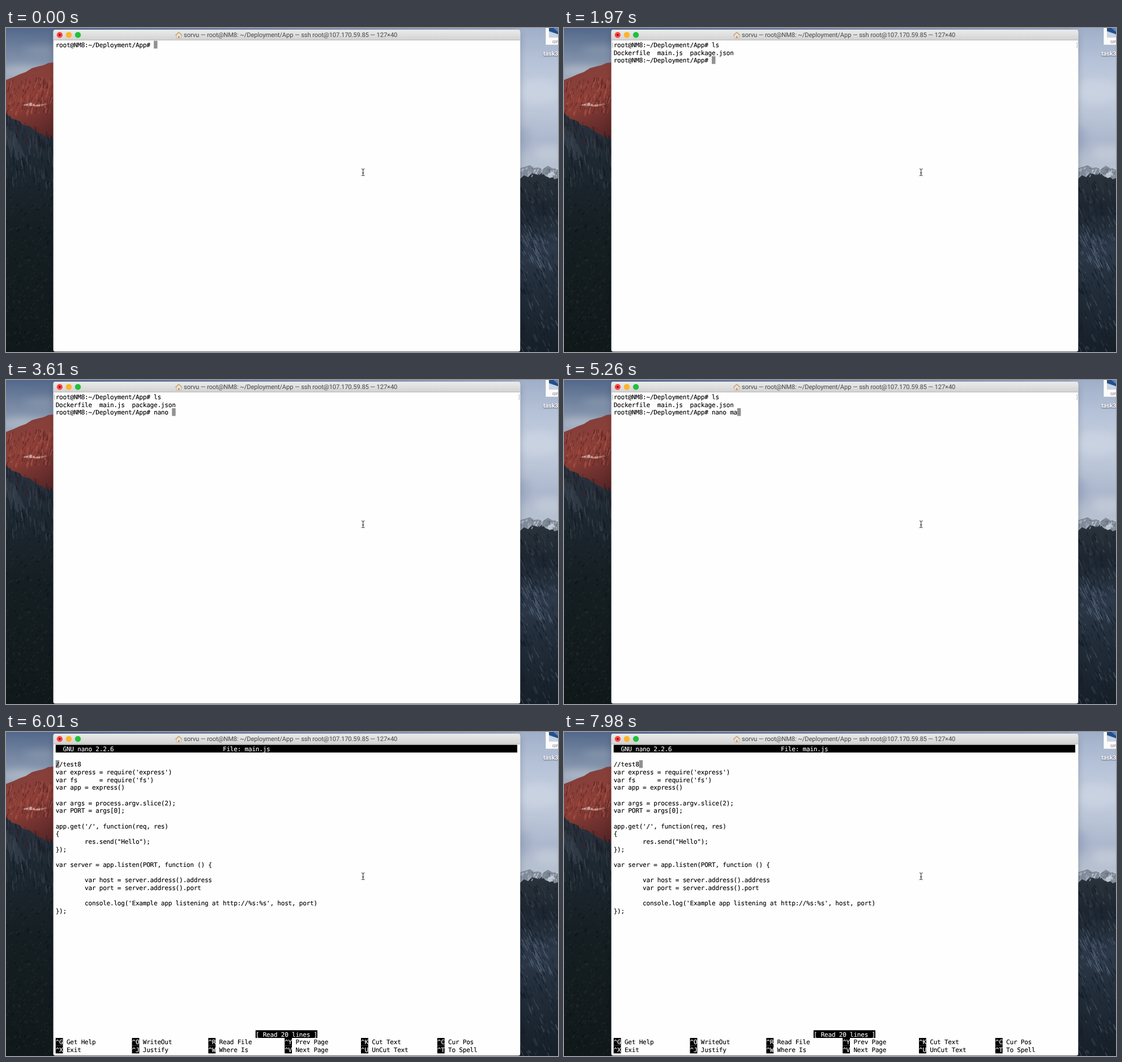
These frames come from a looping animation (975 px wide and 574 px high, 8 s). An HTML page:

```html
<!DOCTYPE html>
<html lang="en">
<head>
<meta charset="utf-8">
<title>Terminal session</title>
<style>
  html, body { margin: 0; width: 100%; height: 100%; overflow: hidden; background: #141c22; }
  svg { display: block; width: 975px; height: 574px; }
  text { white-space: pre; text-rendering: geometricPrecision; }
  .mono { font: 11px "DejaVu Sans Mono", monospace; letter-spacing: -0.2024px; stroke-width: .14px; }
  .ui { font-family: Roboto, "Open Sans", sans-serif; }
</style>
</head>
<body>
<svg viewBox="0 0 975 574" xmlns="http://www.w3.org/2000/svg">
  <defs>
    <linearGradient id="skyTop">
      <stop stop-color="#53688a"/><stop offset="1" stop-color="#a3b1ca"/>
    </linearGradient>
    <linearGradient id="skyLeft" x2="0" y2="1">
      <stop stop-color="#53688a"/><stop offset=".4" stop-color="#7688a3"/><stop offset="1" stop-color="#aab5c6"/>
    </linearGradient>
    <linearGradient id="skyRight" x2="0" y2="1">
      <stop stop-color="#a0afc9"/><stop offset=".2" stop-color="#b4c1d7"/><stop offset=".42" stop-color="#c5cfdf"/>
      <stop offset=".72" stop-color="#acb8cd"/><stop offset="1" stop-color="#bdc6d3"/>
    </linearGradient>
    <linearGradient id="cliff" x2=".3" y2="1">
      <stop stop-color="#7f403d"/><stop offset=".5" stop-color="#8d3f37"/><stop offset="1" stop-color="#5a2728"/>
    </linearGradient>
    <linearGradient id="forest" x2="0" y2="1">
      <stop stop-color="#2b3542"/><stop offset=".22" stop-color="#1d2730"/>
      <stop offset=".5" stop-color="#151e22"/><stop offset="1" stop-color="#10181a"/>
    </linearGradient>
    <linearGradient id="rock" x2="0" y2="1">
      <stop stop-color="#2a323c"/><stop offset=".2" stop-color="#1d2630"/><stop offset=".42" stop-color="#2c3848"/>
      <stop offset=".65" stop-color="#222d3a"/><stop offset="1" stop-color="#161f28"/>
    </linearGradient>
    <linearGradient id="titleBar" x2="0" y2="1">
      <stop stop-color="#ebebeb"/><stop offset="1" stop-color="#d3d3d3"/>
    </linearGradient>
    <filter id="shade" x="-10%" y="-10%" width="120%" height="120%">
      <feDropShadow dx="0" dy="4" stdDeviation="6" flood-opacity=".2"/>
    </filter>
    <filter id="soft" x="-50%" y="-50%" width="200%" height="200%"><feGaussianBlur stdDeviation="7"/></filter>
  </defs>

  <g id="wallpaper">
    <rect width="975" height="8" fill="url(#skyTop)"/>
    <rect width="100" height="110" fill="url(#skyLeft)"/>
    <rect x="895" width="80" height="275" fill="url(#skyRight)"/>
    <g filter="url(#soft)">
      <ellipse cx="30" cy="76" rx="40" ry="9" fill="#b9c2cf" opacity=".7"/>
      <ellipse cx="62" cy="40" rx="30" ry="7" fill="#8c9ab0" opacity=".7"/>
      <ellipse cx="940" cy="112" rx="34" ry="22" fill="#ccd5e3" opacity=".7"/>
      <ellipse cx="915" cy="196" rx="11" ry="22" fill="#99a6c0" opacity=".6"/>
      <ellipse cx="958" cy="222" rx="26" ry="14" fill="#c5ceda" opacity=".7"/>
    </g>
    <path d="M0 92L13 87 24 82 35 78 46 71 57 68 66 66 75 62 84 61V215H0Z" fill="url(#cliff)"/>
    <path d="M0 150L9 160 22 164 31 172 42 174 54 184 62 187 72 194 84 196V574H0Z" fill="url(#forest)"/>
    <path d="M905 249L916 246 925 243 933 248 940 247 948 250 957 244 966 249 975 250V275H905Z" fill="#818b9a"/>
    <path d="M905 270L915 261 922 264 930 257 938 260 947 257 955 264 963 262 969 268 975 266V574H905Z" fill="url(#rock)"/>
    <path d="M28 137L44 132 52 136 75 134 60 139 42 138Z" fill="#c8a69c"/>
    <path d="M0 168L18 190 34 228 20 235 0 205Z" fill="#394350" opacity=".6"/>
    <path d="M952 260L966 255 973 262 960 266Z" fill="#b9c0ca"/>
    <g id="texture" fill="none"/>
  </g>

  <g id="desktopFile" class="ui">
    <rect x="953" y="-4" width="24" height="34" fill="#fbfbfb" stroke="#a7afbb" stroke-width=".6"/>
    <path d="M959 0H975V17H959Z" fill="#5e86bd"/>
    <path d="M959 6L975 11V17H959Z" fill="#c5d3e3"/>
    <path d="M959 0H967L975 7V11L959 5Z" fill="#284e87"/>
    <text x="965" y="27" font-size="7" fill="#777">GIF</text>
    <text x="949" y="48.5" font-size="10.6" font-weight="600" fill="#fff"
      style="text-shadow:0 1px 2px #0009">task3</text>
  </g>

  <g id="window">
    <path d="M83.6 570V7Q83.6 3 87.6 3H904.2Q908.2 3 908.2 7V570Q908.2 573.3 905 573.3H87Q83.6 573.3 83.6 570Z" fill="#fefefe" filter="url(#shade)"/>
    <path d="M83.6 21V7Q83.6 3 87.6 3H904.2Q908.2 3 908.2 7V21Z" fill="url(#titleBar)"/>
    <path d="M83.6 21.3H908.2" stroke="#adadad" stroke-width=".9"/>
    <circle cx="94.8" cy="12.3" r="5.2" fill="#fc4845"/>
    <circle cx="94.8" cy="12.3" r="1.7" fill="#720c0a"/>
    <circle cx="110.9" cy="12.3" r="5.2" fill="#fdb32a"/>
    <circle cx="127" cy="12.3" r="5.2" fill="#22c03a"/>
    <path d="M301 12.5V18H309.5V12.5L305.2 8.5Z" fill="#efe3cd" stroke="#b9a78c" stroke-width=".7"/>
    <path d="M299.2 13L305.2 7.4 311.2 13" fill="none" stroke="#c5a583" stroke-width="1.3"/>
    <path d="M304 18V14.2H306.6V18Z" fill="#b69b7b"/>
    <text class="ui" x="314" y="16.4" font-size="11.2" letter-spacing="-.13" fill="#484848">sorvu — root@NM8: ~/Deployment/App — ssh root@107.170.59.85 — 127×40</text>
  </g>

  <g id="screen"></g>

  <path d="M628 249.5Q630.7 249.5 630.7 251.5V259.8Q630.7 261.8 628 261.8M633.4 249.5Q630.7 249.5 630.7 251.5M630.7 259.8Q630.7 261.8 633.4 261.8M629 256.8H632.4"
    fill="none" stroke="#222" stroke-width="1"/>
</svg>

<script>
const LOOP = 8000, LEFT = 87.7, TOP = 22.67, CELL = 6.42, ROW = 13.667, COLS = 127;
const PROMPT = 'root@NM8:~/Deployment/App# ';
const CODE = `//test8
var express = require('express')
var fs      = require('fs')
var app = express()

var args = process.argv.slice(2);
var PORT = args[0];

app.get('/', function(req, res)
{
        res.send("Hello");
});

var server = app.listen(PORT, function () {

        var host = server.address().address
        var port = server.address().port

        console.log('Example app listening at http://%s:%s', host, port)
});`.split('\n');
const HELP = [
  ['^G Get Help', '^O WriteOut', '^R Read File', '^Y Prev Page', '^K Cut Text', '^C Cur Pos'],
  ['^X Exit', '^J Justify', '^W Where Is', '^V Next Page', '^U UnCut Text', '^T To Spell']
];

const cellX = col => LEFT + col * CELL;
const rowY = row => TOP + row * ROW;
const escapeText = s => s.replace(/&/g, '&amp;').replace(/</g, '&lt;').replace(/ /g, '\u00a0');

const fillCells = (col, row, count, color) =>
  `<rect x="${cellX(col)}" y="${rowY(row)}" width="${count * CELL}" height="${ROW}" fill="${color}"/>`;
const print = (col, row, s, color = '#000') =>
  `<text class="mono" x="${cellX(col)}" y="${rowY(row) + 11.2}" fill="${color}" stroke="${color}">${escapeText(s)}</text>`;
const inverse = (col, row, s, count = s.length) =>
  fillCells(col, row, count, '#000') + print(col, row, s, '#fff');
const cursor = (col, row) => fillCells(col, row, 1, '#929292');

// Brackets the terminal puts around a submitted prompt line.
const lineMarks = row => {
  const y = rowY(row) + 3.6;
  return `<path d="M87 ${y}H85.5V${y + 8}H87M905 ${y}H906.5V${y + 8}H905" fill="none" stroke="#b4b4b4" stroke-width=".9"/>`;
};

const promptLine = (row, typed) =>
  cursor(PROMPT.length + typed.length, row) + print(0, row, PROMPT + typed);

const firstPrompt = typed => promptLine(0, typed);

const secondPrompt = (typed, submitted) =>
  lineMarks(0) + print(0, 0, PROMPT + 'ls') +
  print(0, 1, 'Dockerfile  main.js  package.json') +
  promptLine(2, typed) + (submitted ? lineMarks(2) : '');

const editor = col =>
  fillCells(0, 0, COLS, '#000') +
  print(2, 0, 'GNU nano 2.2.6', '#fff') + print(46, 0, 'File: main.js', '#fff') +
  cursor(col, 2) + CODE.map((line, i) => print(0, i + 2, line)).join('') +
  inverse(55, 37, '[ Read 20 lines ]') +
  HELP.map((items, r) => items.map((item, i) =>
    inverse(i * 21, 38 + r, item.slice(0, 2)) + print(i * 21 + 3, 38 + r, item.slice(3))
  ).join('')).join('');

const STEPS = [
  [0, firstPrompt, ''], [450, firstPrompt, 'ls'],
  [620, secondPrompt, ''], [1370, secondPrompt, 'n'], [1970, secondPrompt, ''],
  [2270, secondPrompt, 'n'], [2420, secondPrompt, 'na'], [2560, secondPrompt, 'nan'],
  [3460, secondPrompt, 'nano'], [3610, secondPrompt, 'nano '],
  [5260, secondPrompt, 'nano ma'], [5560, secondPrompt, 'nano main.js '],
  [5860, secondPrompt, 'nano main.js ', true],
  ...[6010, 7060, 7240, 7380, 7530, 7680, 7830, 7980].map((time, col) => [time, editor, col])
];

function drawTexture() {
  let seed = 7;
  const random = () => (seed = seed * 16807 % 2147483647) / 2147483647;
  // skew moves the band's lower side down across its width
  const streaks = (count, x, y, w, h, length, slant, skew, colors) => {
    let out = '';
    for (let i = 0; i < count; i++) {
      const u = random(), len = length * (.4 + random());
      const px = x + u * w, py = y + u * skew + random() * h;
      out += `<path d="M${px.toFixed(1)} ${py.toFixed(1)}l${(slant * len).toFixed(1)} ${len.toFixed(1)}" stroke="${colors[i % colors.length]}" stroke-width="${(.8 + 1.2 * random()).toFixed(1)}" opacity=".6"/>`;
    }
    return out;
  };
  document.getElementById('texture').innerHTML =
    streaks(190, 2, 92, 82, 58, 9, -.25, -8, ['#5e2629', '#b9604f', '#4b2229', '#a14a3c']) +
    streaks(70, 0, 152, 84, 30, 13, .1, 36, ['#3a2529', '#1a222c', '#141b24']) +
    streaks(110, 0, 180, 84, 85, 14, .1, 14, ['#404b59', '#111920', '#303a46']) +
    streaks(420, 2, 265, 82, 305, 3.5, -.9, 0, ['#232e31', '#0a1012', '#2a3434']) +
    streaks(60, 908, 246, 67, 14, 4, -.4, 2, ['#c3cad3', '#4f5a69', '#dde1e6']) +
    streaks(280, 908, 268, 67, 300, 9, .45, 0, ['#4a596c', '#10171f', '#354253', '#151d27']) +
    streaks(70, 910, 340, 50, 55, 11, .5, 40, ['#5a6b81', '#46566b']);
}

const screen = document.getElementById('screen');
const start = performance.now();
let shown = null;

function update() {
  const time = (performance.now() - start) % LOOP;
  const step = STEPS.findLast(([from]) => from <= time);
  if (step !== shown) {
    const [, draw, ...state] = step;
    screen.innerHTML = draw(...state);
    shown = step;
  }
  requestAnimationFrame(update);
}

drawTexture();
update();
</script>
</body>
</html>
```
